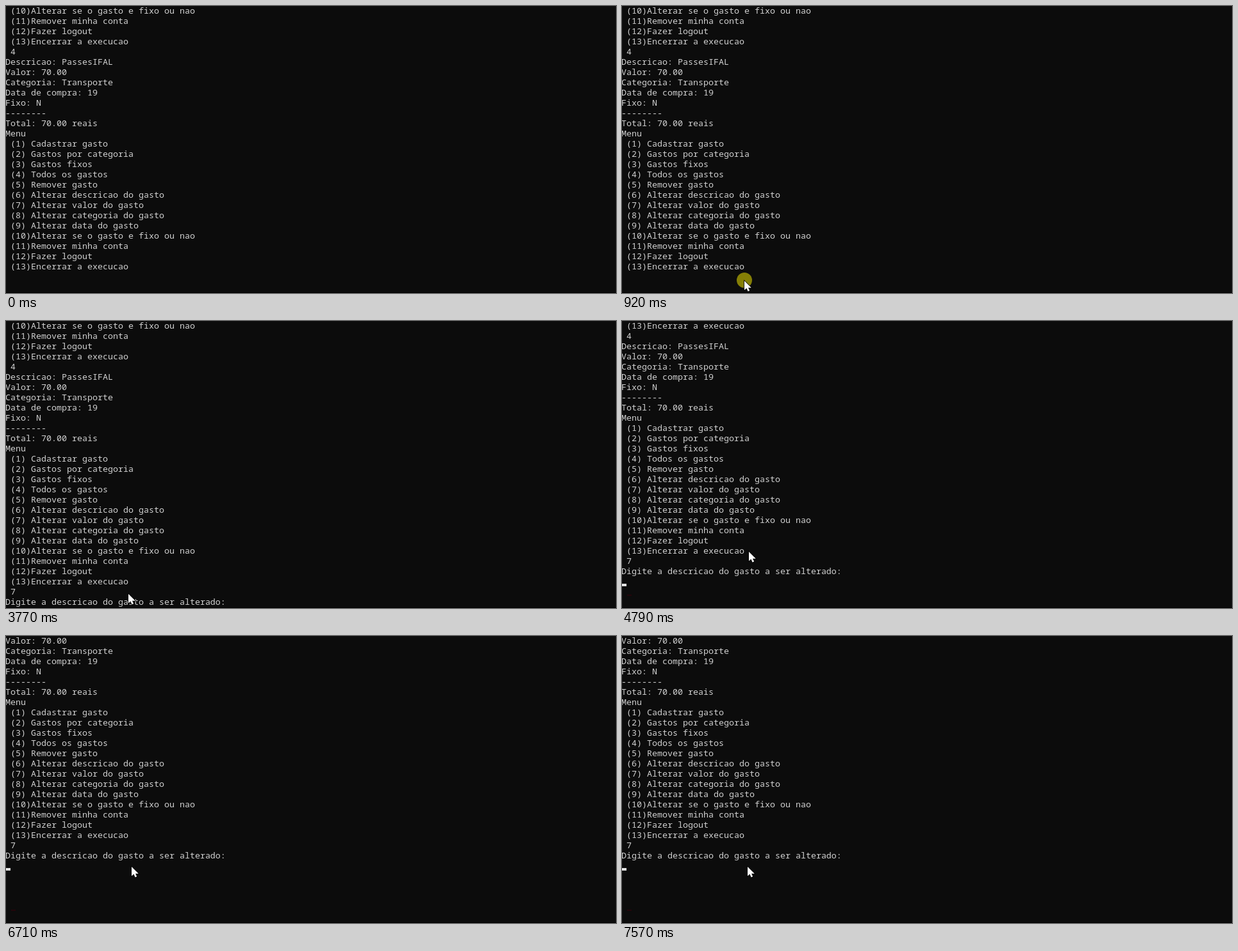
An HTML page with a canvas that plays this animation: 952 px wide and 449 px high, repeating every 8 s.

```html
<!DOCTYPE html>
<html lang="pt">
<head>
<meta charset="utf-8">
<title>Menu de gastos</title>
<style>
  html, body { margin: 0; width: 100%; height: 100%; overflow: hidden; background: #0c0c0c; }
  canvas { display: block; }
</style>
</head>
<body>
<canvas width="952" height="449"></canvas>
<script>
const LOOP = 8000, CELL = 8, ROW = 16, LEFT = -1;
const BLINK = 1052, WHEEL_LINES = 3;

// Moments of the session, in ms
const ENTER_STAGE = 130, CLICK = 920, RELEASE = 1050, FOCUS = 1450, TYPE = 1850, PROMPT = 3370;
const CLIMB = 4600, WHEEL = 4790, WHEEL_AGAIN = 4850, HIDE = 5790, SHOW = 6650;
const LOOK_BACK = 6840, RETURN = 7570;

const ctx = document.querySelector('canvas').getContext('2d', { alpha: false });
const arrow = new Path2D('M0 0V14.6L3.4 11.5 5.6 16.4 8.2 15.3 6 10.7H10.8Z');

const menu = [
  'Cadastrar gasto', 'Gastos por categoria', 'Gastos fixos', 'Todos os gastos',
  'Remover gasto', 'Alterar descricao do gasto', 'Alterar valor do gasto',
  'Alterar categoria do gasto', 'Alterar data do gasto',
  'Alterar se o gasto e fixo ou nao', 'Remover minha conta', 'Fazer logout',
  'Encerrar a execucao',
].map((label, i) => ` (${i + 1})`.padEnd(5) + label);

const screen = [
  ...menu.slice(-4),
  ' 4',
  'Descricao: PassesIFAL',
  'Valor: 70.00',
  'Categoria: Transporte',
  'Data de compra: 19',
  'Fixo: N',
  '--------',
  'Total: 70.00 reais',
  'Menu',
  ...menu,
];

const within = (t, from, to) => t >= from && t < to;
const progress = (t, from, to) => Math.min(1, Math.max(0, (t - from) / (to - from)));

function rect(color, x, y, w, h) {
  ctx.fillStyle = color;
  ctx.fillRect(x, y, w, h);
}

function drawText(t, scroll) {
  const lines = [...screen];
  if (t >= TYPE) lines.push(' 7');
  if (t >= PROMPT) lines.push('Digite a descricao do gasto a ser alterado:');
  ctx.font = '500 13.333px "Noto Sans Mono", monospace';
  ctx.fillStyle = '#d0d0d0';
  lines.forEach((text, i) => ctx.fillText(text, LEFT, (i - scroll) * ROW + 12));
}

function drawCaret(t, scroll) {
  const blinkStart = t < RETURN ? FOCUS : RETURN;
  const lit = t >= FOCUS && (t - blinkStart) % BLINK < BLINK / 2;
  if (!lit || within(t, LOOK_BACK, RETURN)) return;
  const column = t < TYPE ? 1 : t < PROMPT ? 2 : 0;
  const row = screen.length + (t < PROMPT ? 0 : 2) - scroll;
  rect('#e4e4e4', LEFT + column * CELL, row * ROW + 11, CELL, 4);
}

function pointerAt(t) {
  if (t < CLICK) {
    const p = 1 - (1 - progress(t, ENTER_STAGE, CLICK)) ** 2;
    return [857 - 665 * p, 445 - 15 * p - 52 * Math.sin(Math.PI * p)];
  }
  const drift = progress(t, 1250, 2300), climb = progress(t, CLIMB, WHEEL);
  const x = t < SHOW ? 191 + 7 * climb : 196;
  return [Math.round(x), Math.round(430 - 3 * drift - 66 * climb)];
}

function drawPointer(t) {
  if (t < ENTER_STAGE || within(t, HIDE, SHOW)) return;
  ctx.save();
  ctx.translate(...pointerAt(t));
  ctx.strokeStyle = '#000';
  ctx.lineWidth = 1.5;
  ctx.stroke(arrow);
  ctx.fillStyle = '#fff';
  ctx.fill(arrow);
  ctx.restore();
}

function draw(t) {
  const oneNotch = within(t, WHEEL, WHEEL_AGAIN) || within(t, LOOK_BACK, RETURN);
  const scroll = t < WHEEL ? 0 : WHEEL_LINES * (oneNotch ? 1 : 2);

  rect('#0c0c0c', 0, 0, 952, 449);
  drawText(t, scroll);
  if (scroll) rect('#24060b', 8, 428, 7, 2); // faint trace of the old caret
  drawCaret(t, scroll);

  if (within(t, CLICK, RELEASE)) {
    ctx.fillStyle = '#857f06';
    ctx.beginPath();
    ctx.arc(191, 429, 12, 0, 2 * Math.PI);
    ctx.fill();
  }
  drawPointer(t);
  rect('#000', 0, 448, 952, 1);
}

const start = performance.now();
function tick() {
  draw((performance.now() - start) % LOOP);
  requestAnimationFrame(tick);
}
tick();
</script>
</body>
</html>
```
